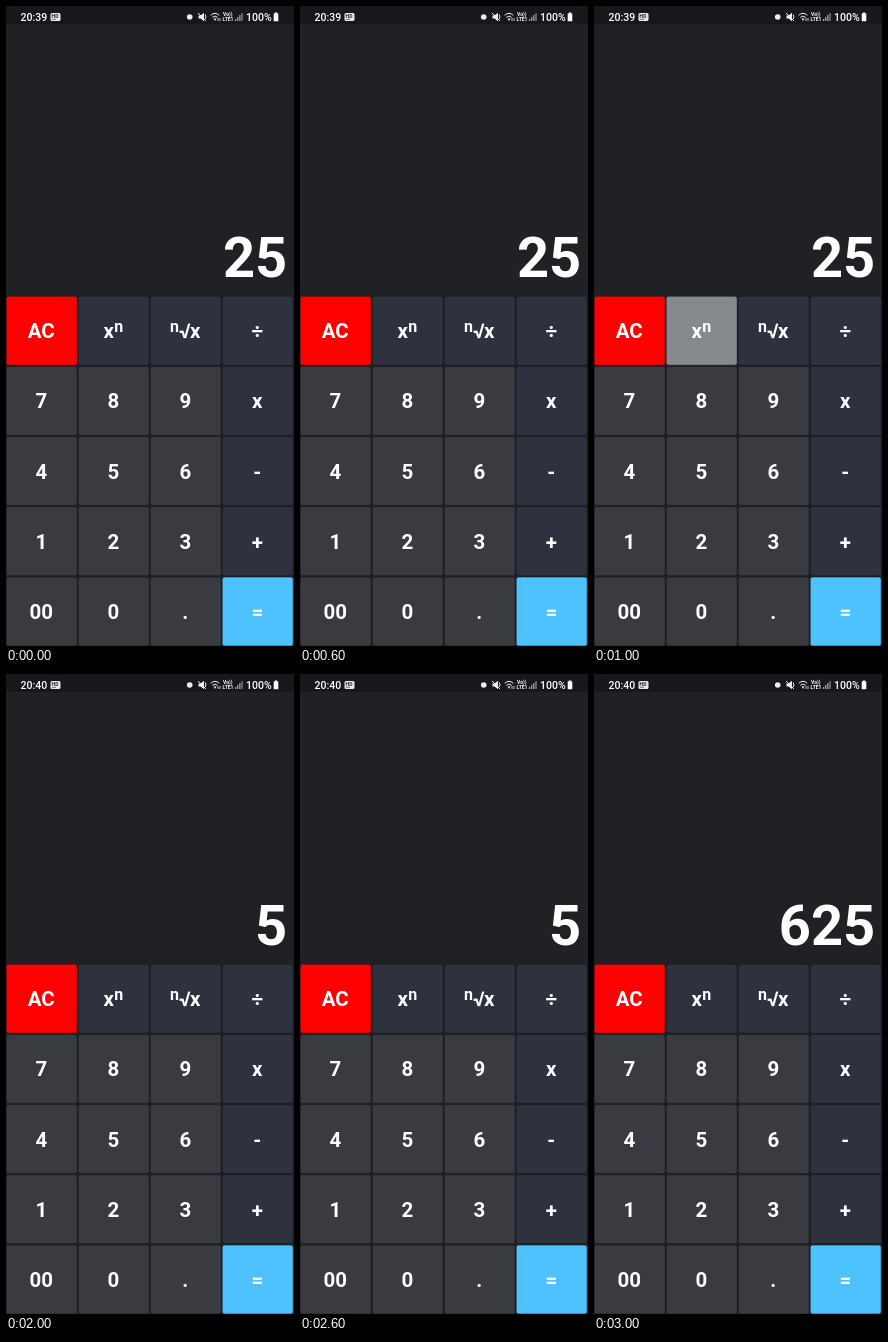
An HTML page for the animation above (4000 ms loop, 288 by 640 pixels).

```html
<!DOCTYPE html>
<html lang="en">
<head>
<meta charset="utf-8">
<title>Calculator</title>
<style>
  html, body { margin: 0; width: 100%; height: 100%; overflow: hidden; background: #202124; }
  svg { display: block; width: 288px; height: 640px; }
  text { font-family: Roboto, sans-serif; fill: #fff; }
  .key { font-size: 20.5px; font-weight: 700; text-anchor: middle; }
  .sup { font-size: 16px; }
  .status { font-size: 10.5px; font-weight: 500; }
  .tiny { font-size: 5px; font-weight: 700; }
  #result { font-size: 56px; font-weight: 700; text-anchor: end; }
</style>
</head>
<body>
<svg viewBox="0 0 288 640">
  <rect width="288" height="640" fill="#202124"/>
  <rect width="288" height="18" fill="#17181c"/>
  <text id="clock" class="status" x="14.5" y="14.5"></text>
  <rect x="44.5" y="7" width="10" height="8" rx="1.5" fill="#e8e8e8"/>
  <text class="tiny" x="45.6" y="12.2" style="fill:#222">HD</text>
  <path d="M46 13.3h4" stroke="#555" stroke-width=".8"/>
  <circle cx="183.7" cy="11" r="2.8" fill="#eee"/>
  <g fill="none" stroke="#eee" stroke-width="1">
    <path d="M192.5 9.5h2l3.5-2.7v8.4l-3.5-2.7h-2z" fill="#eee" stroke="none"/>
    <path d="M192 7l8 8M199.3 8.5q1.2 2.3 0 4.5"/>
    <path d="M204.7 9.3q4.3-4 8.6 0M206.4 11.3q2.6-2.4 5.2 0"/>
    <path d="M208 12.8h2l-1 1.6zM212 12v3M214 12v3" stroke-width=".8"/>
    <path d="M229.7 15v-2M231.8 15v-4M233.9 15v-6" stroke="#ccc"/>
    <path d="M236 15v-8" stroke="#aaa"/>
  </g>
  <text class="tiny" x="217" y="10.3">Vo))</text>
  <text class="tiny" x="216.5" y="15.2">LTE1</text>
  <text class="status" x="240" y="14.5">100%</text>
  <path d="M268.8 6.5h2.4v1h1.1v7.7h-4.6v-7.7h1.1z" fill="#fff"/>
  <text id="result" x="281.2" y="271"></text>
  <g id="keys"></g>
</svg>
<script>
const $ = id => document.getElementById(id);
const rows = [
  ['AC', 'pow', 'root', '÷'],
  ['7', '8', '9', 'x'],
  ['4', '5', '6', '-'],
  ['1', '2', '3', '+'],
  ['00', '0', '.', '=']
];
const colors = { AC: '#ff0000', '=': '#4dc2ff' };
const dark = '#2d323e', grey = '#3a3b40', pressed = '#868a8f';

const label = (s, x, y, cls = '') => `<text class="key ${cls}" x="${x}" y="${y}">${s}</text>`;

function face(key, x, y) {
  if (key === 'pow') return label('x', x - 4.6, y) + label('n', x + 5.4, y - 6, 'sup');
  if (key === 'root') return label('n', x - 10.7, y - 6, 'sup') + label('√', x - .5, y) + label('x', x + 10, y);
  return label(key, x, y);
}

$('keys').innerHTML = rows.map((row, r) => row.map((key, c) => {
  const x = 72 * c, y = 290.2 + 70.2 * r;
  const fill = colors[key] || (r === 0 || c === 3 ? dark : grey);
  return `<rect id="key-${r}-${c}" x="${x + .2}" y="${y}" width="71" height="69" rx="2.5"
    fill="${fill}" stroke="#18191c" stroke-width=".6"/>` + face(key, x + 35.3, y + 41.9);
}).join('')).join('');

const steps = [
  { clock: '20:39', result: '25' },
  { clock: '20:39', result: '25', press: true },
  { clock: '20:40', result: '5' },
  { clock: '20:40', result: '625' }
];
let last = -1;

function draw(now) {
  const i = Math.floor(now / 1000) % steps.length;
  if (i !== last) {
    const s = steps[i];
    $('clock').textContent = s.clock;
    $('result').textContent = s.result;
    $('key-0-1').setAttribute('fill', s.press ? pressed : dark);
    last = i;
  }
}

const start = performance.now();
function tick() {
  draw(performance.now() - start);
  requestAnimationFrame(tick);
}
tick();
</script>
</body>
</html>
```
